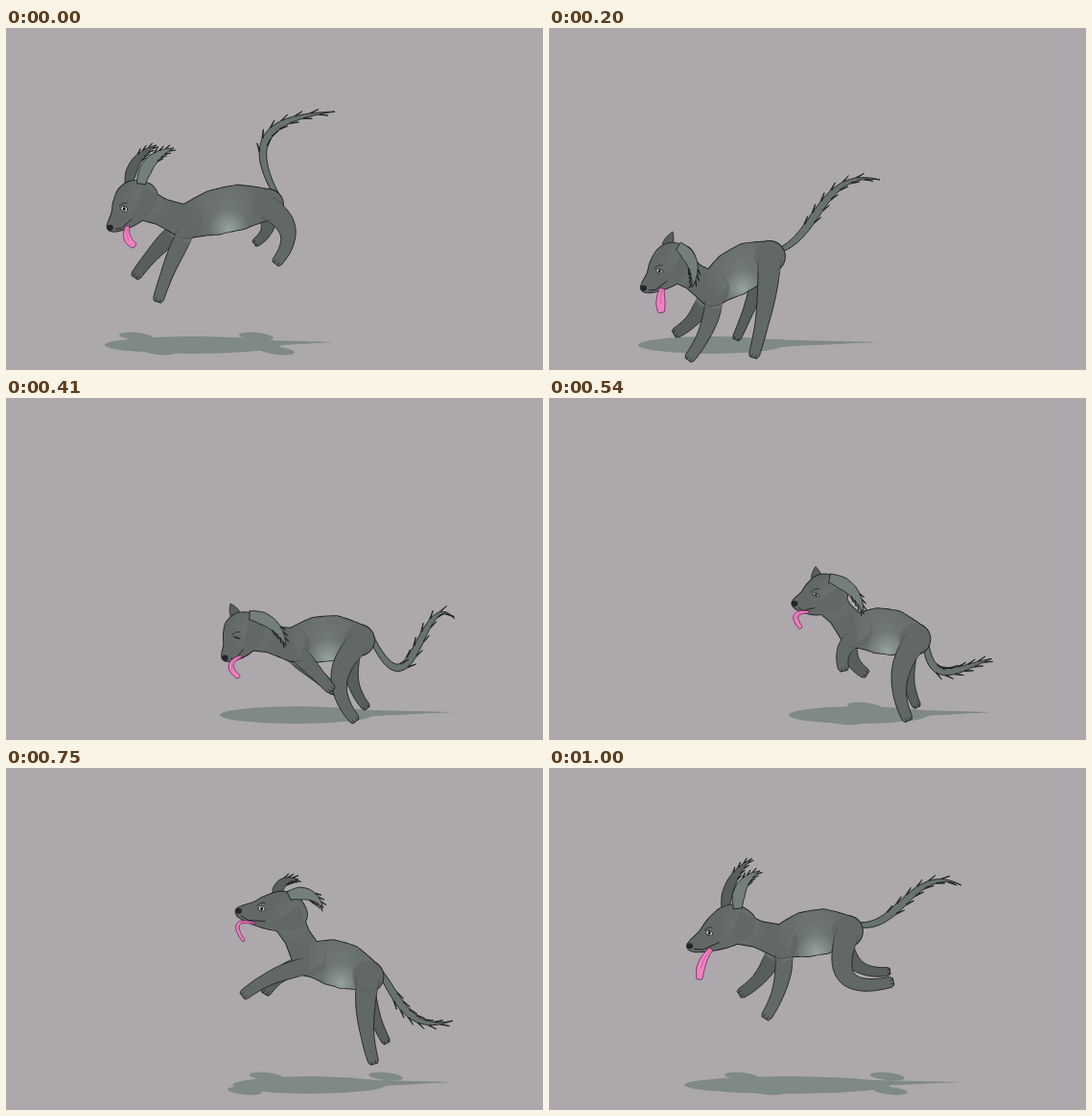
Write an HTML page with a canvas that moves like this. It is 560 by 356 pixels and loops after 1.12 s.

```html
<!DOCTYPE html>
<html lang="en">
<head>
<meta charset="utf-8">
<title>Running dog</title>
<style>
html, body { margin: 0; width: 100%; height: 100%; overflow: hidden; background: #aca8ab; }
canvas { display: block; width: 560px; height: 356px; }
</style>
</head>
<body>
<canvas id="stage" width="560" height="356"></canvas>
<script>
const ctx = document.getElementById('stage').getContext('2d');
const INK = '28,31,31', FUR = '98,104,103', FAR = '88,94,93', PALE = '116,127,124';
const LOOP = 1120, GROUND = 329;

// Joints of the rig; every outline is derived from them.
// head: skull, nose, eye opening   spine: chest, rump
// fore, hind: near foot, far foot, knee bend
// tail: tip, two bends   ears: near tip, far tip   tongue: tip, bend
const poses = {
  leap: { head: [137, 181, 107, 209, 1], spine: [188, 202, 273, 184],
    fore: [159, 282, 136, 257, 2], hind: [283, 243, 261, 223, -16],
    tail: [343, 87, -72, -45], ears: [175, 125, 157, 122], tongue: [133, 226, 4] },
  land: { head: [131, 246, 97, 272, .7], spine: [171, 272, 230, 238],
    fore: [147, 343, 133, 317, -5], hind: [214, 340, 196, 322, -3],
    tail: [345, 158, 10, -45], ears: [149, 270, 129, 212], tongue: [117, 294, 1] },
  gather: { head: [181, 246, 150, 268, 1], spine: [226, 266, 293, 246],
    fore: [256, 331, 230, 331, 2], hind: [256, 338, 266, 330, 3],
    tail: [324, 134, 87, -66], ears: [196, 279, 176, 212], tongue: [173, 284, 2] },
  crouch: { head: [250, 245, 227, 272, .15], spine: [300, 257, 368, 252],
    fore: [338, 302, 342, 304, 0], hind: [363, 334, 375, 321, 18],
    tail: [468, 230, 110, -45], ears: [292, 258, 234, 214], tongue: [242, 290, 9] },
  rear: { head: [327, 168, 281, 157, .9], spine: [340, 229, 395, 250],
    fore: [276, 260, 316, 268, 14], hind: [384, 332, 391, 318, 6],
    tail: [455, 313, 10, 80], ears: [364, 192, 322, 137], tongue: [282, 187, 10] },
  stretch: { head: [255, 136, 200, 140, 1], spine: [293, 170, 360, 184],
    fore: [222, 211, 227, 197, -4], hind: [382, 278, 401, 250, 4],
    tail: [477, 213, 12, -2], ears: [298, 100, 288, 95], tongue: [213, 172, 18] },
  tuck: { head: [193, 165, 145, 186, .9], spine: [243, 181, 311, 170],
    fore: [227, 258, 201, 234, -6], hind: [356, 223, 353, 212, 30],
    tail: [430, 122, 22, -40], ears: [220, 107, 212, 94], tongue: [157, 218, 3] }
};

// start time, pose, next pose, blend, shift
const beats = [
  [0, 'leap'], [80, 'leap', 'land', .4, -18], [140, 'leap', 'land', .72, -22],
  [200, 'land'], [290, 'gather'], [330, 'gather', 'crouch', .5],
  [410, 'crouch'], [540, 'crouch', 'rear', .5], [660, 'rear'],
  [750, 'rear', 'stretch', .5], [870, 'stretch'], [1000, 'tuck']
];

const mix = (a, b, t) => a + (b - a) * t;
const between = (a, b, t) => [mix(a[0], b[0], t), mix(a[1], b[1], t)];
const rgb = (c, a = 1) => `rgba(${c},${a})`;

function blend(a, b, t) {
  const out = {};
  for (const k in a) out[k] = a[k].map((v, i) => mix(v, b[k][i], t));
  return out;
}

function toward(a, b) {
  const x = b[0] - a[0], y = b[1] - a[1], len = Math.hypot(x, y) || 1;
  return { x: x / len, y: y / len, len };
}

// Point part of the way from a to b, pushed sideways.
function bulge(a, b, t, side) {
  const d = toward(a, b), [x, y] = between(a, b, t);
  return [x - d.y * side, y + d.x * side];
}

const quad = (a, b, c) => t => between(between(a, b, t), between(b, c, t), t);
const cubic = (a, b, c, d) => t => between(quad(a, b, c)(t), quad(b, c, d)(t), t);
const bow = (a, b, side) => quad(a, bulge(a, b, .5, side * 2), b);

function taper(...w) {
  return t => {
    const u = t * (w.length - 1), i = Math.min(w.length - 2, Math.floor(u));
    return mix(w[i], w[i + 1], u - i);
  };
}

function lines(pts) {
  const path = new Path2D();
  pts.forEach(q => path.lineTo(...q));
  return path;
}

function oval(x, y, rx, ry, turn = 0) {
  const path = new Path2D();
  path.ellipse(x, y, rx, ry, turn, 0, 7);
  return path;
}

function blob(p) {
  const n = p.length, at = i => p[(i + n) % n], path = new Path2D();
  path.moveTo(...p[0]);
  p.forEach((b, i) => {
    const a = at(i - 1), c = at(i + 1), d = at(i + 2);
    path.bezierCurveTo(b[0] + (c[0] - a[0]) / 6, b[1] + (c[1] - a[1]) / 6,
      c[0] - (d[0] - b[0]) / 6, c[1] - (d[1] - b[1]) / 6, ...c);
  });
  path.closePath();
  return path;
}

// Band of changing half width along a curve; barbs grow from its edges.
function ribbon(curve, half, barb = 0, from = 0) {
  const steps = 36, sides = [[], []];
  for (let i = 0; i <= steps; i++) {
    const t = i / steps, [x, y] = curve(t), w = half(t);
    const d = toward(curve(t - .01), curve(t + .01));
    const put = (side, out, ahead) =>
      sides[side ? 1 : 0].push([x - d.y * out + d.x * ahead, y + d.x * out + d.y * ahead]);
    [0, 1].forEach(k => {
      const sign = k ? -1 : 1;
      put(k, sign * w, 0);
      if (barb && t > from && t < .9 && (i + 2 * k) % 4 === 0) {
        put(k, sign * (w + barb * .4), barb * 1.8);
        put(k, sign * w * .8, barb * .4);
      }
      if (i === steps) put(k, sign * w * .7, w * .6);
    });
  }
  const path = lines([...sides[0], ...sides[1].reverse()]);
  path.closePath();
  return path;
}

function fill(path, style) {
  ctx.fillStyle = style;
  ctx.fill(path);
}

function ink(path, width = .9, style = rgb(INK)) {
  ctx.strokeStyle = style;
  ctx.lineWidth = width;
  ctx.stroke(path);
}

function part(path, color) {
  fill(path, rgb(color));
  ink(path);
}

// One outline around several overlapping shapes.
function merge(paths, color) {
  paths.forEach(p => ink(p, 1.8));
  paths.forEach(p => fill(p, rgb(color)));
}

function radial([x, y], inner, outer, color, a0, a1) {
  const g = ctx.createRadialGradient(x, y, inner, x, y, outer);
  g.addColorStop(0, rgb(color, a0));
  g.addColorStop(1, rgb(color, a1));
  return g;
}

function leg(joint, foot, bend, half, color) {
  const curve = bow(joint, foot, bend), path = ribbon(curve, half);
  fill(path, radial(joint, 4, 15, color, 0, 1));
  ink(path, .9, radial(joint, 9, 20, INK, 0, 1));
  const d = toward(curve(.95), foot), [x, y] = foot;
  for (const k of [-2, 2])
    ink(lines([[x - d.y * k, y + d.x * k], [x - d.y * k + d.x * 3, y + d.x * k + d.y * 3]]), .7);
}

function ear(root, tip, width, color) {
  const long = toward(root, tip).len > 30;
  const curve = bow(root, tip, long ? -8 : 0);
  part(ribbon(curve, taper(width * .7, width, width * .85, width * .5, 0), long ? 4 : 0, .55), color);
}

function shadow(feet, nose, rump, tip) {
  const xs = feet.map(f => f[0]);
  const left = Math.min(nose[0], ...xs) - 4, right = Math.max(rump[0] + 14, ...xs);
  const tone = '#7f8987', mid = (left + right) / 2;
  fill(oval(mid, GROUND + 1, (right - left) / 2, 9), tone);
  fill(ribbon(bow([mid, GROUND], [tip[0], GROUND - 2], 0), taper(8, 3, 0)), tone);
  feet.forEach(([x, y], i) => {
    if (y < 300) fill(oval(x, GROUND + (i % 2 ? -8 : 7), 18, 4, .1), tone);
  });
}

function dog(p) {
  const [sx, sy, nx, ny, open] = p.head;
  const skull = [sx, sy], nose = [nx, ny];
  const chest = p.spine.slice(0, 2), rump = p.spine.slice(2);
  const [near, far] = [0, 2].map(i => k => p[k].slice(i, i + 2));
  const u = toward(skull, nose), L = u.len;
  // Head frame: along the muzzle, then up from it.
  const at = (a, up) => [sx + u.x * a - u.y * up, sy + u.y * a + u.x * up];
  const below = (q, dx, dy) => [q[0] + dx, q[1] + dy];

  shadow([near('fore'), far('fore'), near('hind'), far('hind')], nose, rump, near('tail'));

  const base = below(rump, 11, -7), tip = near('tail'), [, , b1, b2] = p.tail;
  const tail = cubic(base, bulge(base, tip, 1 / 3, b1), bulge(base, tip, 2 / 3, b2), tip);
  part(ribbon(tail, taper(2.6, 3.6, 4, 3.4, 2, 0), 6, .25), '104,114,112');

  const foreHalf = taper(9, 8.5, 6.5, 5.5), hindHalf = taper(12, 10, 7, 5.5);
  leg(below(chest, -6, 5), far('fore'), p.fore[4], foreHalf, FAR);
  leg(below(rump, -4, 4), far('hind'), p.hind[4] / 2, taper(9, 8, 5.5, 4.5), FAR);
  ear(below(skull, -9, -16), far('ears'), 5.5, FAR);

  const torso = ribbon(quad(chest, below(between(chest, rump, .5), 0, -8), rump), taper(17, 23, 23, 16));
  const neck = ribbon(quad(skull, between(skull, chest, .5), chest), taper(17, 13.5, 17));
  const head = blob([at(L, 2), at(L * .66, 10), at(L * .44, 17), at(L * .1, 23), at(-12, 19),
    at(-23, 1), at(-14, -15), at(L * .3, -17), at(L - 5, -8)]);
  const body = [torso, oval(...chest, 17, 17), oval(...rump, 16, 16), neck, head];
  merge(body, FUR);

  ctx.save();
  const skin = new Path2D();
  body.forEach(b => skin.addPath(b));
  ctx.clip(skin);
  const middle = between(chest, rump, .5);
  const glow = (q, r, color, a) => fill(oval(...q, r, r), radial(q, 0, r, color, a, 0));
  glow(below(middle, 0, -6), 42, '130,142,139', .45);
  glow(at(-8, -4), 26, '130,142,139', .3);
  glow(below(middle, 2, 17), 22, '158,172,169', .85);
  ctx.restore();

  leg(below(rump, 0, 3), near('hind'), p.hind[4], hindHalf, FUR);
  leg(below(chest, 2, 6), near('fore'), p.fore[4], foreHalf, FUR);
  ear(below(skull, 4, -19), near('ears'), 6.5, PALE);

  // Face
  const mouth = at(L * .6, -12), [tx, ty, curl] = p.tongue;
  ink(lines([at(L - 5, -5), at(L * .75, -9), at(L * .4, -9)]));
  const wide = Math.max(1.8, 5 - curl * .25);
  const lick = bow(mouth, [tx, ty], curl);
  const tongue = ribbon(lick, taper(wide * .5, wide * .8, wide, wide * .8));
  fill(tongue, '#f47fc4');
  ink(tongue, .8, '#5d2348');
  ink(lines([lick(0), lick(.35), lick(.7)]), .6, '#b9488c');

  fill(oval(...at(L - 2, 0), 3.4, 3), '#222626');
  const [ex, ey] = at(L - 26, 4);
  const eye = oval(ex, ey, 3.6, 2.8 * open, .3);
  fill(eye, '#dfe2e0');
  ink(eye);
  fill(oval(ex, ey, 1.5, 2 * open), '#171919');
  ink(lines([[ex - 5, ey - 3], [ex - 1, ey - 6], [ex + 3, ey - 6]]), .7);
}

function draw(now) {
  const [, a, b, k, shift = 0] = beats.filter(s => s[0] <= now % LOOP).pop();
  ctx.fillStyle = '#aca8ab';
  ctx.fillRect(0, 0, 560, 356);
  ctx.save();
  ctx.translate(shift, 0);
  ctx.lineJoin = ctx.lineCap = 'round';
  dog(b ? blend(poses[a], poses[b], k) : poses[a]);
  ctx.restore();
}

const start = performance.now();
function tick() {
  draw(Math.max(0, performance.now() - start));
  requestAnimationFrame(tick);
}
tick();
</script>
</body>
</html>
```
